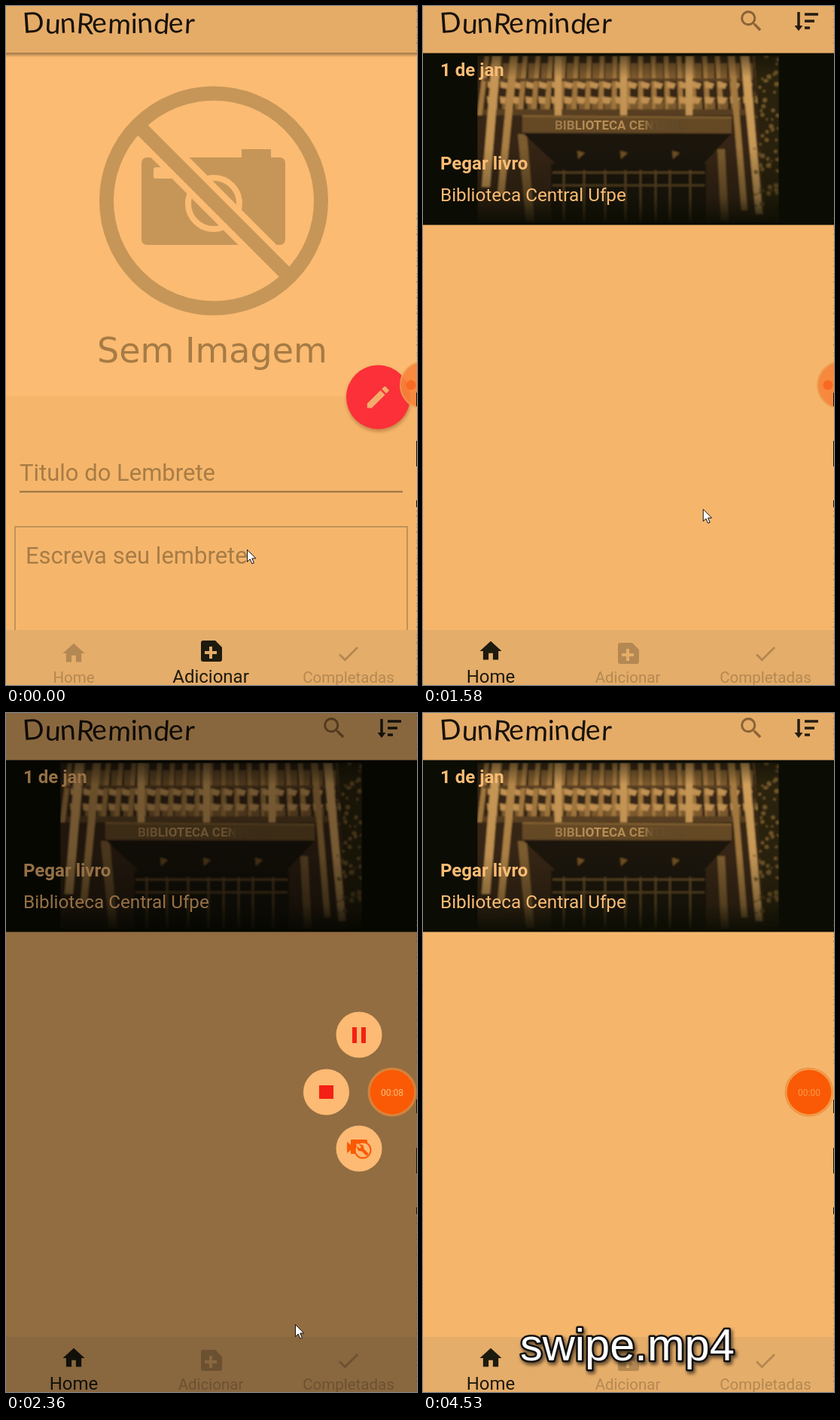
Recreate the animation shown at these times as an HTML page. Size 546 by 901 pixels, loop 4.63 s.

```html
<!DOCTYPE html>
<html lang="pt">
<head>
<meta charset="utf-8">
<title>Lembretes</title>
<style>
html, body { margin: 0; width: 100%; height: 100%; overflow: hidden; background: #f5b66c; }
svg { display: block; width: 100%; height: 100%; font-family: Roboto, sans-serif; }
.brand { font: 37.5px Lato, sans-serif; fill: #17120a; }
.hint { font-size: 31px; fill: #a87c45; }
.card { font-size: 24.3px; fill: #fbbc74; }
.bold { font-weight: 700; font-size: 24px; }
.mid { text-anchor: middle; }
.caption { font: 59.6px "Liberation Sans", Arial, sans-serif; }
</style>
</head>
<body>
<svg viewBox="0 0 546 901" preserveAspectRatio="none">
  <defs>
    <linearGradient id="signFade">
      <stop offset="0" stop-color="#a07848"/><stop offset=".3" stop-color="#c3965a"/>
      <stop offset=".68" stop-color="#b1874f"/><stop offset=".75" stop-color="#6b5230"/>
      <stop offset="1" stop-color="#604825"/>
    </linearGradient>
    <linearGradient id="photoShade" x2="0" y2="1">
      <stop offset="0" stop-color="#0b0c03" stop-opacity=".5"/><stop offset=".13" stop-color="#0b0c03" stop-opacity="0"/>
      <stop offset=".55" stop-color="#0b0c03" stop-opacity=".05"/><stop offset=".85" stop-color="#0b0c03" stop-opacity=".4"/>
      <stop offset="1" stop-color="#0b0c03" stop-opacity=".92"/>
    </linearGradient>
    <linearGradient id="shadow" x2="0" y2="1">
      <stop offset="0" stop-color="#7c6039" stop-opacity=".75"/><stop offset="1" stop-color="#7c6039" stop-opacity="0"/>
    </linearGradient>
    <clipPath id="photoClip"><path d="M72 66H473V287H72z"/></clipPath>
    <filter id="soft" x="-30%" y="-30%" width="160%" height="160%"><feGaussianBlur stdDeviation="2.2"/></filter>
    <filter id="photoBlur"><feGaussianBlur stdDeviation=".8"/></filter>
  </defs>

  <path fill="#f5b66c" d="M0 0H546V901H0z"/>

  <g id="addPage">
    <path fill="#fbbb72" d="M0 62H546V518H0z"/>
    <g fill="#c69658">
      <rect x="180" y="201" width="191" height="116" rx="7"/>
      <path d="M313 190h39v14h-39z"/>
      <rect x="196" y="214" width="38" height="15" rx="3" fill="#fbbb72"/>
      <circle cx="276" cy="262" r="34" stroke="#fbbb72" stroke-width="8"/>
      <path d="M178 161 374 357" stroke="#fbbb72" stroke-width="36"/>
      <path d="M178 161 374 357" stroke="#c69658" stroke-width="19"/>
      <circle cx="276" cy="258.5" r="142.5" fill="none" stroke="#c69658" stroke-width="19"/>
    </g>
    <text x="121" y="473" font-size="46" fill="#a67b45" style="font-family:'DejaVu Sans',sans-serif">Sem Imagem</text>
    <text class="hint" x="18" y="630">Titulo do Lembrete</text>
    <path d="M18 644.5H527" stroke="#94703f" stroke-width="2"/>
    <path d="M12 830V691H533V830" fill="none" stroke="#bf9359" stroke-width="2"/>
    <text class="hint" x="26" y="740">Escreva seu lembrete</text>
    <circle cx="495" cy="522" r="43" fill="#a86c36" opacity=".6" filter="url(#soft)"/>
    <circle cx="494.5" cy="519" r="42.5" fill="#fb3038"/>
    <path transform="translate(475 500) scale(1.6)" fill="#f4ac6c" d="M3 17.25V21h3.75L17.81 9.94l-3.75-3.75zM20.71 7.04a1 1 0 000-1.41l-2.34-2.34a1 1 0 00-1.41 0l-1.83 1.83 3.75 3.75z"/>
  </g>

  <g id="homePage">
    <path fill="#f5b66c" d="M0 62H546V901H0z"/>
    <path fill="#0b0c03" d="M0 62H546V290.5H0z"/>
    <g clip-path="url(#photoClip)">
      <g filter="url(#photoBlur)">
        <path fill="#382812" d="M72 66H473V287H72z"/>
        <g id="facade"></g>
        <path fill="#2a230e" d="M440 66h33v221h-18z"/>
        <g id="leaves" fill="#74592b"></g>
        <path fill="#1a1207" d="M133 169H410L370 212 176 209zM170 209H376V287H170z"/>
        <path fill="#684b25" d="M132 145 410 147V169L132 168z"/>
        <path fill="#8b6736" d="M132 145 410 147v2L132 147z"/>
        <path stroke="#6b5029" stroke-width="2.5" fill="none" d="M172 221H374M172 238H374M187 218v69M214 218v69M242 218v69M269 218v69M289 218v69M309 218v69M328 218v69M355 218v69"/>
        <path fill="#765428" d="M205 192l10 3-9 8zM262 192l10 3-9 8zM331 192l10 3-9 8z"/>
      </g>
      <text x="175" y="164" font-size="17" font-weight="700" fill="url(#signFade)">BIBLIOTECA CENTRAL</text>
      <path fill="url(#photoShade)" d="M72 66H473V287H72z"/>
    </g>
    <text class="card bold" x="23" y="93">1 de jan</text>
    <text class="card bold" x="23" y="217">Pegar livro</text>
    <text class="card" x="23" y="259">Biblioteca Central Ufpe</text>
  </g>

  <path fill="#e5ac68" d="M0 0H546V62.5H0z"/>
  <rect id="headerShadow" y="62" width="546" height="6" fill="url(#shadow)"/>
  <text class="brand" x="23" y="36" rotate="-4 3 -3 4 -5 3 0 -3 4 -4 3">DunReminder</text>
  <g id="tools">
    <path transform="translate(417.5 1.4) scale(1.55)" fill="#8a6435" d="M15.5 14h-.79l-.28-.27A6.47 6.47 0 0016 9.5 6.5 6.5 0 109.5 16c1.61 0 3.09-.59 4.23-1.57l.27.28v.79l5 4.99L20.49 19zm-6 0C7.01 14 5 11.99 5 9.5S7.01 5 9.5 5 14 7.01 14 9.5 11.99 14 9.5 14z"/>
    <path stroke="#231d10" stroke-width="3.5" fill="none" d="M499 8V30M507 11H525M507 20H520M507 29H514"/>
    <path fill="#231d10" d="M493.5 26h11L499 33z"/>
  </g>

  <path fill="#e5ad6a" d="M0 828H546V901H0z"/>
  <g id="tabs"></g>

  <rect id="dim" width="546" height="901"/>

  <g id="docked">
    <circle cx="555" cy="503" r="31" fill="#f8853a" stroke="#eda052" stroke-width="2" opacity=".9"/>
    <circle cx="538" cy="503" r="6.5" fill="#f86a22"/>
  </g>

  <g id="menu"></g>

  <g id="bubble">
    <circle cx="513" cy="503" r="31.5" fill="#f79a45" stroke="#e98a38" stroke-width="2" opacity=".7"/>
    <circle cx="513" cy="503" r="29.5" fill="#fa5a05"/>
    <text id="timer" class="mid" x="513" y="507.5" font-size="12" fill="#f9c27a"></text>
  </g>

  <path id="cursor" fill="#fff" stroke="#111" d="M.5.5v16l3.7-3.5 2.6 6 2.6-1-2.6-6h5z"/>

  <g id="caption" class="caption">
    <text x="131" y="862" fill="#000" stroke="#000" stroke-width="6" stroke-linejoin="round" opacity=".55" filter="url(#soft)">swipe.mp4</text>
    <text x="129" y="859" fill="#fff" stroke="#111" stroke-width="5" stroke-linejoin="round" paint-order="stroke">swipe.mp4</text>
  </g>

  <path stroke="#5d482c" stroke-dasharray="1 5 2 9 1 3" opacity=".45" d="M545.5 0V62M545.5 275V470M545.5 670V901"/>
  <path stroke="#17140a" d="M545.5 513v18M545.5 577v34M545.5 656v9"/>
</svg>
<script>
const LOOP = 4630;
const $ = id => document.getElementById(id);
const show = (id, opacity) => { $(id).style.opacity = Number(opacity); };
const mix = (a, b, k) => a + (b - a) * k;
// Value of the last [time, value] step that has begun.
const stepAt = (steps, t) => steps.reduce((value, [start, next]) => t >= start ? next : value, 0);

function buildPhoto() {
  let seed = 7;
  const random = () => (seed = seed * 16807 % 2147483647) / 2147483647;
  let facade = '', leaves = '';
  const shape = (fill, d) => { facade += `<path fill="${fill}" d="${d}"/>`; };
  for (let x = 82; x < 446; x += 17) {
    const lean = (x - 268) * .05;
    shape('#a1763e', `M${x} 66h6l${lean} 79h-7z`);
    shape('#7d5a2e', `M${x + 7} 76h9v20h-9zM${x + 6} 126h11v12h-11z`);
    shape('#c29252', `M${x + 4} 100l12 3-3 7-9-2zM${x + 3} 120l14 2-5 8-8-1z`);
  }
  shape('#5a4120', 'M80 96H438v4H80zM80 137H438v8H80z');
  for (const x of [175, 262, 349]) shape('#c6965500', `M${x} 66h9v79h-9z`.trim());
  for (const x of [175, 262, 349]) shape('#c69655', `M${x} 66h9v79h-9z`);
  shape('#c69655', 'M92 66h11L89 240h-11z');
  shape('#b28446', 'M116 66h10L108 250h-9z');
  shape('#cf9e5a', 'M422 66h11l18 210h-9z');
  shape('#a57a41', 'M406 66h8l17 205h-8z');
  shape('#815e31', 'M126 170h12l10 117h-11zM391 190h10l5 97h-10z');
  for (let i = 0; i < 70; i++) {
    leaves += `<circle cx="${440 + random() * 33}" cy="${66 + random() * 200}" r="${1 + random() * 2}"/>`;
  }
  $('facade').innerHTML = facade;
  $('leaves').innerHTML = leaves;
}

const tabs = [
  { label: 'Home', x: 90, icon: '<path transform="translate(72.6 838.5) scale(1.45)" d="M10 20v-6h4v6h5v-8h3L12 3 2 12h3v8z"/>' },
  { label: 'Adicionar', x: 272, icon: '<path fill-rule="evenodd" d="M262 842h16l9 9v16a3 3 0 01-3 3h-22a3 3 0 01-3-3v-22a3 3 0 013-3zM270 850v6h-6v4h6v6h4v-6h6v-4h-6v-6z"/>' },
  { label: 'Completadas', x: 455, icon: '<path transform="translate(437 838.7) scale(1.48)" d="M9 16.17 4.83 12l-1.42 1.41L9 19 21 7l-1.41-1.41z"/>' }
];

const buttons = [
  { x: 469, y: 427, icon: '<path fill="#f42015" d="M-9-10h6v21h-6zM3-10h6v21H3z"/>' },
  { x: 425.5, y: 503, icon: '<path fill="#f42015" d="M-9.5-9h19V9h-19z"/>' },
  { x: 469, y: 578, icon: `<path fill="#fa5a05" d="M-16-9l5 4v-7H9a2 2 0 012 2V7h-22V2l-5 4z"/>
    <circle cx="5" cy="2" r="10.5" fill="#fcba74" stroke="#fa5a05" stroke-width="2"/>
    <path stroke="#fa5a05" stroke-width="4" stroke-linecap="round" d="M3 0 10 7"/><circle cx="2" cy="-1" r="4.5" fill="#fa5a05"/><path stroke="#fcba74" stroke-width="3" d="M2-1-3-6"/>` }
];

function build() {
  buildPhoto();
  $('tabs').innerHTML = tabs.map(({ label, x, icon }) =>
    `<g><g>${icon}</g><text class="mid" x="${x}" y="898">${label}</text></g>`).join('');
  $('menu').innerHTML = buttons.map(({ icon }) =>
    `<g><circle r="30.5" fill="#fcba74"/>${icon}</g>`).join('');
}

function drawTab(index, active) {
  const tab = $('tabs').children[index];
  const [icon, text] = tab.children;
  const channel = (off, on) => Math.round(mix(off, on, active));
  icon.setAttribute('transform', `translate(0 ${mix(3, 0, active)})`);
  text.setAttribute('font-size', mix(20.5, 24, active));
  tab.setAttribute('fill', `rgb(${channel(180, 29)},${channel(136, 26)},${channel(82, 14)})`);
}

function drawCursor(t) {
  let x = 320, y = 721;
  if (t >= 810) x = 317;
  if (t >= 1580) {
    const k = stepAt([[1580, .25], [1700, .5], [1820, .75], [1940, 1]], t);
    x = mix(317, 536, k);
    y = mix(721, 506, k);
  }
  if (t >= 2360) [x, y] = [384, 811];
  $('cursor').setAttribute('transform', `translate(${x} ${y})`);
  show('cursor', t < 2090 || (t >= 2360 && t < 2480));
}

function draw(t) {
  const home = stepAt([[810, .6], [930, 1]], t);
  show('homePage', home);
  show('addPage', home < 1);
  show('tools', home);
  show('headerShadow', 1 - home);
  drawTab(0, home);
  drawTab(1, 1 - home);
  drawTab(2, 0);

  const open = stepAt([[2210, .5], [2360, 1], [4000, 0]], t);
  show('dim', open * .405);
  show('menu', open);
  buttons.forEach(({ x, y }, i) => $('menu').children[i].setAttribute('transform',
    `translate(${mix(513, x, open)} ${mix(503, y, open)}) scale(${mix(.4, 1, open)})`));

  show('docked', t < 2090);
  show('bubble', stepAt([[2090, 1], [4000, 0], [4150, .5], [4270, 1]], t));
  $('timer').textContent = stepAt([[0, '00:08'], [2890, '00:09'], [3430, '00:10'], [4000, '00:00']], t);
  show('timer', t < 4000 ? 1 : .6);
  show('caption', t >= 4000);
  drawCursor(t);
}

build();
const start = performance.now();
function tick() {
  draw((performance.now() - start) % LOOP);
  requestAnimationFrame(tick);
}
tick();
</script>
</body>
</html>
```
